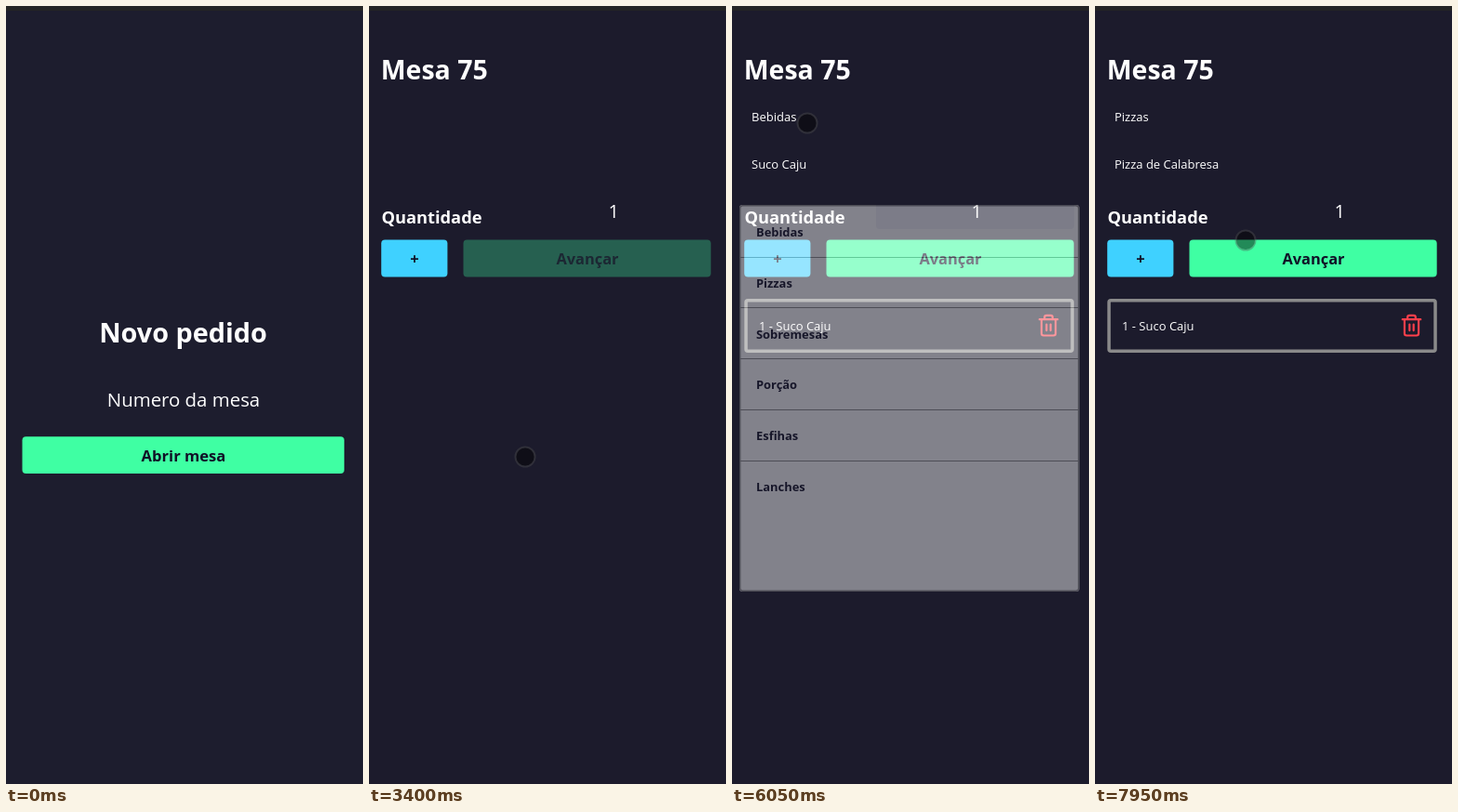
Recreate the animation shown at these times as an HTML page with a canvas. Size 384 by 837 pixels, loop 8 s.

```html
<!DOCTYPE html>
<html lang="pt">
<head>
<meta charset="utf-8">
<title>Novo pedido</title>
<style>
html, body { margin: 0; width: 100%; height: 100%; overflow: hidden; background: #1d1d2e; }
canvas { display: block; width: 384px; height: 837px; }
</style>
</head>
<body>
<canvas id="stage"></canvas>
<script>
const W = 384, H = 837, LOOP = 8000;
const FONT = '"Open Sans", "Noto Sans", sans-serif';
const C = {
  dark: '#1d1d2e', page: '#1c1b2c', field: '#101026', strip: '#242424',
  green: '#3fffa3', blue: '#3fd1ff', red: '#ff3f4b', grey: '#8a8a8a', white: '#fff'
};
const CATEGORIES = ['Bebidas', 'Pizzas', 'Sobremesas', 'Porção', 'Esfihas', 'Lanches'];
const DRINK = 'Suco Caju';

// Moments of the story, in ms
const AT = { focus: 800, seven: 2050, five: 2300, leave: 3000, table: 3200, loaded: 3550, added: 5050, pick: 7100 };

// Pointer path: time, x, y
const PATH = [
  [100, 190, 17], [700, 172, 430], [2700, 172, 430], [2950, 168, 485],
  [3650, 168, 485], [4100, 94, 165], [4200, 94, 165], [4600, 60, 275],
  [4800, 55, 276], [5100, 55, 276], [5750, 81, 126], [6100, 81, 126],
  [6450, 77, 237], [6650, 77, 295], [6900, 71, 304], [7250, 71, 304],
  [7900, 163, 258], [7950, 162, 252]
];

const dpr = window.devicePixelRatio || 1;

function prepare(canvas) {
  canvas.width = W * dpr;
  canvas.height = H * dpr;
  const c = canvas.getContext('2d');
  c.scale(dpr, dpr);
  return c;
}

const stage = prepare(document.getElementById('stage'));
const layer = prepare(document.createElement('canvas'));
let ctx = stage;

const trash = new Path2D('M3 6H21M19 6v14a2 2 0 0 1-2 2H7a2 2 0 0 1-2-2V6m3 0V4a2 2 0 0 1 2-2h4a2 2 0 0 1 2 2v2M10 11v6M14 11v6');

const clamp = v => Math.max(0, Math.min(1, v));
const ramp = (t, a, b) => clamp((t - a) / (b - a));
const smooth = k => k * k * (3 - 2 * k);

function box(x, y, w, h, r, color) {
  ctx.fillStyle = color;
  ctx.beginPath();
  ctx.roundRect(x, y, w, h, r);
  ctx.fill();
}

function frame(x, y, w, h, r, line, color) {
  ctx.strokeStyle = color;
  ctx.lineWidth = line;
  ctx.beginPath();
  ctx.roundRect(x + line / 2, y + line / 2, w - line, h - line, r);
  ctx.stroke();
}

function label(text, x, y, size, color, bold, align = 'left') {
  ctx.font = `${bold ? 700 : 400} ${size}px ${FONT}`;
  ctx.textAlign = align;
  ctx.fillStyle = color;
  ctx.fillText(text, x, y);
}

// Paints a group on its own layer, then blends it as one
function faded(alpha, paint) {
  ctx = layer;
  ctx.clearRect(0, 0, W, H);
  paint();
  ctx = stage;
  ctx.globalAlpha = alpha;
  ctx.drawImage(layer.canvas, 0, 0, W, H);
  ctx.globalAlpha = 1;
}

function bin(cx, cy, size) {
  ctx.save();
  ctx.translate(cx - size / 2, cy - size / 2);
  ctx.scale(size / 24, size / 24);
  ctx.strokeStyle = C.red;
  ctx.lineWidth = 2;
  ctx.lineCap = ctx.lineJoin = 'round';
  ctx.stroke(trash);
  ctx.restore();
}

function background(color) {
  ctx.fillStyle = color;
  ctx.fillRect(0, 0, W, H);
  ctx.fillStyle = C.strip;
  ctx.fillRect(0, 0, W, 5);
}

function caretOn(t) {
  if (t < AT.seven) return t < 1250 || t >= 1700;
  return t < 2800;
}

function openScreen(t) {
  background(C.dark);
  label('Novo pedido', 190.5, 362, 28.8, C.white, true, 'center');
  const typed = t < AT.seven ? '' : t < AT.five ? '7' : '75';
  const focused = t >= AT.focus && t < AT.leave;
  if (focused) {
    box(15.5, 391, 350, 63, 5, '#f6dcae');
    box(17, 392.5, 347, 60, 4, '#e09a20');
    box(19, 394.5, 343, 56, 2, typed ? C.field : C.dark);
  } else if (typed) {
    box(18, 393, 346, 60, 4, C.field);
  }
  label(typed || 'Numero da mesa', 191, 431, 20.4, C.white, false, 'center');
  if (focused && caretOn(t)) {
    ctx.fillStyle = C.white;
    ctx.fillRect(191 + Math.round(typed.length * 5.7), 407, 1, 31);
  }
  box(17.5, 463.2, 346.3, 39.8, 4, C.green);
  label('Abrir mesa', 191, 490, 16.6, C.field, true, 'center');
}

function menu() {
  box(8, 214, 365.5, 416, 3, C.white);
  frame(8, 214, 365.5, 416, 3, 1.4, C.grey);
  CATEGORIES.forEach((name, i) => {
    const y = 248 + i * 54.8;
    label(name, 26, Math.round(y), 12.9, C.field, true);
    if (i < 5) {
      ctx.fillStyle = C.grey;
      ctx.fillRect(9, Math.round(y + 21.5), 364, 1);
    }
  });
}

function tableScreen(t) {
  const shown = t < AT.pick ? ramp(t, 5905, 6230) : 1 - ramp(t, 7050, 7273);
  const solid = shown > 0.95;
  const added = t >= AT.added;
  background(solid ? C.dark : C.page);

  if (solid) {
    box(13.5, 99, 354.5, 39, 4, C.field);
    box(13.5, 150, 354.5, 39, 4, C.field);
    box(155, 201, 213, 39, 4, C.field);
  } else if (shown > 0) {
    box(155, 214, 213, 26, [0, 0, 4, 4], C.field);
  }

  label('Mesa 75', 12.7, 79, 28.5, C.white, true);
  if (t >= AT.loaded) {
    const pizza = t >= AT.pick;
    if (!added) bin(155.8, 68, 28);
    label(pizza ? 'Pizzas' : 'Bebidas', 21, 124, 13, C.white);
    label(pizza ? 'Pizza de Calabresa' : DRINK, 21, 175, 13, C.white);
  }

  if (!solid) {
    label('Quantidade', 13.4, 234, 18.3, C.white, true);
    label('1', 263.2, 228, 20, C.white, false, 'center');
  }
  box(13.2, 251.6, 71.2, 39.8, 4, C.blue);
  label('+', 49, 278, 16.5, C.field, true, 'center');
  faded(added ? 1 : 0.3, () => box(101.5, 251.6, 266.2, 39.8, 4, C.green));
  label('Avançar', 235, 278, 16.4, added ? C.field : '#1c2733', true, 'center');

  if (added) {
    frame(13.3, 315, 354.5, 58, 2, 3.5, C.grey);
    label('1 - ' + DRINK, 29, 349, 13, C.white);
    bin(340.5, 343.7, 26);
  }
  if (shown > 0) faded(shown, menu);
}

function pointer(t) {
  if (t < PATH[0][0]) return;
  let i = 0;
  while (i < PATH.length - 2 && t >= PATH[i + 1][0]) i++;
  const [t0, x0, y0] = PATH[i], [t1, x1, y1] = PATH[i + 1];
  const k = smooth(ramp(t, t0, t1));
  const x = x0 + (x1 - x0) * k, y = y0 + (y1 - y0) * k;
  ctx.fillStyle = 'rgba(0,0,0,.46)';
  ctx.beginPath();
  ctx.arc(x, y, 10, 0, 7);
  ctx.fill();
  ctx.strokeStyle = 'rgba(79,79,79,.4)';
  ctx.lineWidth = 2;
  ctx.beginPath();
  ctx.arc(x, y, 10.5, 0, 7);
  ctx.stroke();
}

const start = performance.now();
function draw() {
  const t = (performance.now() - start) % LOOP;
  if (t < AT.table) openScreen(t);
  else tableScreen(t);
  pointer(t);
  requestAnimationFrame(draw);
}
draw();
</script>
</body>
</html>
```
